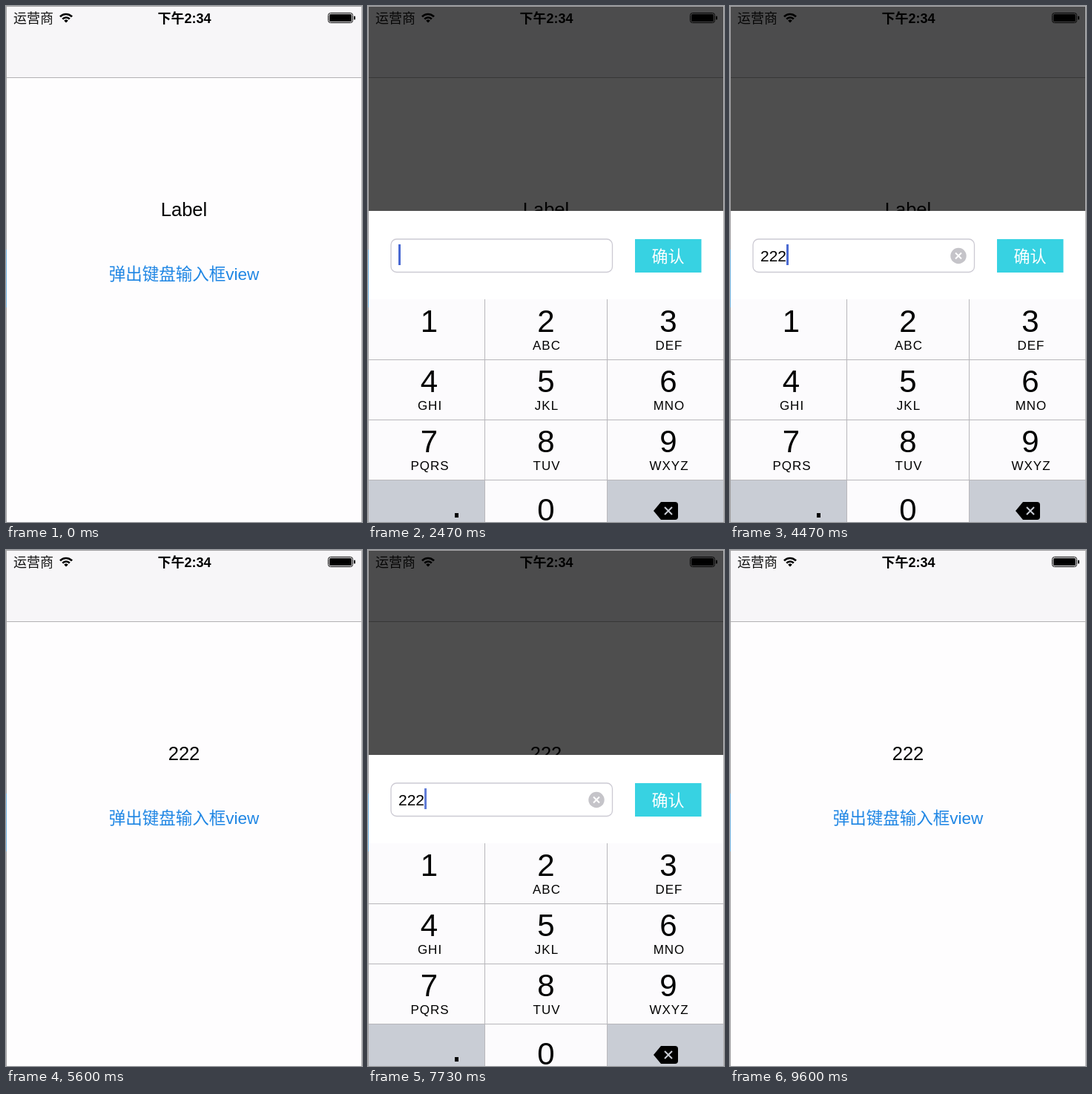
An HTML page with a canvas for the animation above (9.79 s loop, 480 px wide and 695 px high).

```html
<!DOCTYPE html>
<html lang="zh">
<head>
<meta charset="utf-8">
<style>
  html, body { margin: 0; width: 100%; height: 100%; overflow: hidden; background: #fefdfe; }
  canvas { display: block; }
</style>
</head>
<body>
<canvas width="480" height="695"></canvas>
<script>
const ctx = document.querySelector('canvas').getContext('2d');
const LOOP = 9790, SCREEN_H = 720, PANEL_Y = 276, KEYS_Y = 395, ROW = 81;
const FONT = '"Liberation Sans", Arial, "Noto Sans CJK SC", "Noto Sans CJK", sans-serif';

// Each visit: link pressed, panel opens, panel closes (ms)
const VISITS = [
  { press: 870, open: 1184, close: 4680 },
  { press: 6270, open: 6746, close: 8194 },
];
const TAPS = [3900, 4110, 4320];
const ALERT = { show: 2560, hide: 3400 };
const COLUMNS = [[0, 157, 82.5], [158, 164, 240], [323, 157, 405]];
const LETTERS = ['', 'ABC', 'DEF', 'GHI', 'JKL', 'MNO', 'PQRS', 'TUV', 'WXYZ'];

const clamp = v => Math.max(0, Math.min(1, v));
const ramp = (t, start, length) => clamp((t - start) / length);
const easeOut = v => Math.sin(v * Math.PI / 2);
const settle = ms => 1 - Math.exp(-Math.max(0, ms) / 100);

function rect(x, y, w, h, color) {
  ctx.fillStyle = color;
  ctx.fillRect(x, y, w, h);
}

function text(str, x, y, size, color = '#000', align = 'center', weight = 400, spacing = 0) {
  ctx.font = `${weight} ${size}px ${FONT}`;
  ctx.letterSpacing = spacing + 'px';
  ctx.textAlign = align;
  ctx.fillStyle = color;
  ctx.fillText(str, x, y);
}

function round(x, y, w, h, r) {
  ctx.beginPath();
  ctx.roundRect(x, y, w, h, r);
}

function cross(x, y, r, color) {
  ctx.beginPath();
  ctx.moveTo(x - r, y - r); ctx.lineTo(x + r, y + r);
  ctx.moveTo(x + r, y - r); ctx.lineTo(x - r, y + r);
  ctx.strokeStyle = color;
  ctx.lineWidth = 2;
  ctx.stroke();
}

function statusBar() {
  text('运营商', 10, 22.5, 18, '#111', 'left');
  text('下午2:34', 240.5, 22.5, 18, '#000', 'center', 700);
  ctx.strokeStyle = '#000';
  ctx.lineWidth = 2.6;
  for (const r of [6.5, 11]) {
    ctx.beginPath();
    ctx.arc(81, 22, r, -Math.PI * .76, -Math.PI * .24);
    ctx.stroke();
  }
  ctx.fillStyle = '#000';
  ctx.beginPath();
  ctx.moveTo(81, 22.5);
  ctx.arc(81, 22, 3.6, -Math.PI * .78, -Math.PI * .22);
  ctx.fill();
  ctx.lineWidth = 1;
  round(434.5, 9.5, 33, 13, 3);
  ctx.stroke();
  round(436, 11, 30, 10, 1.5);
  ctx.fill();
  round(469, 13.5, 2, 5, 1);
  ctx.fill();
}

function page(label, linkAlpha) {
  rect(0, 0, 480, 695, '#fefdfe');
  rect(0, 0, 480, 96, '#f7f6f8');
  rect(0, 96, 480, 1, '#b2b1b3');
  statusBar();
  text(label, 240, 283, 25.5);
  ctx.globalAlpha = linkAlpha;
  text('弹出键盘输入框view', 240, 368.5, 22.5, '#1f86e4');
  ctx.globalAlpha = 1;
}

function inputPanel(y, value, cursorAlpha) {
  rect(0, y, 480, SCREEN_H, '#fff');
  round(31, y + 38, 298.5, 44.5, 7.5);
  ctx.strokeStyle = '#cccad3';
  ctx.lineWidth = 1.3;
  ctx.stroke();
  text(value, 41, y + 67.5, 21, '#000', 'left');
  ctx.globalAlpha = cursorAlpha;
  rect(41 + value.length * 11.68, y + 45, 3, 28, '#4a6ad2');
  ctx.globalAlpha = 1;
  if (value) {
    ctx.beginPath();
    ctx.arc(308, y + 60.5, 10.7, 0, 7);
    ctx.fillStyle = '#c5c4c9';
    ctx.fill();
    cross(308, y + 60.5, 4, '#fff');
  }
  rect(360, y + 38, 89.5, 45, '#37d2e2');
  text('确认', 404.5, y + 69, 22, '#fff');
}

function keyboard(y, twoPressed) {
  rect(0, y, 480, 324, '#fcfbfd');
  for (const c of [0, 2]) rect(COLUMNS[c][0], y + 3 * ROW, COLUMNS[c][1], ROW, '#c9cdd5');
  if (twoPressed) rect(158, y, 164, ROW, '#c9cdd5');
  for (const x of [157, 322]) rect(x, y, 1, 324, '#b8b7bb');
  for (let row = 1; row < 4; row++) rect(0, y + row * ROW, 480, 1, '#b8b7bb');
  LETTERS.forEach((letters, i) => {
    const x = COLUMNS[i % 3][2], top = y + Math.floor(i / 3) * ROW;
    text(i + 1, x, top + 44, 42);
    text(letters, x + 1, top + 67.5, 17, '#000', 'center', 400, 1);
  });
  const last = y + 3 * ROW;
  text('0', 240, last + 55, 42);
  rect(117, last + 45, 5, 6, '#000');
  ctx.beginPath();
  ctx.moveTo(385, last + 42);
  ctx.lineTo(395, last + 30);
  ctx.arcTo(418, last + 30, 418, last + 54, 4);
  ctx.arcTo(418, last + 54, 395, last + 54, 4);
  ctx.lineTo(395, last + 54);
  ctx.fillStyle = '#000';
  ctx.fill();
  cross(405, last + 42, 5, '#c9cdd5');
}

function alertBox(alpha, scale) {
  ctx.save();
  ctx.globalAlpha = alpha;
  rect(0, 0, 480, 695, 'rgba(0,0,0,.4)');
  ctx.translate(240, 359.5);
  ctx.scale(scale, scale);
  ctx.translate(-240, -359.5);
  round(38, 282, 404, 155, 10.5);
  ctx.clip();
  const frost = ctx.createLinearGradient(0, 282, 0, 437);
  frost.addColorStop(0, '#dddcdf');
  frost.addColorStop(.3, '#f1f1f3');
  frost.addColorStop(1, '#f0eff1');
  rect(38, 282, 404, 155, frost);
  const glow = ctx.createRadialGradient(405, 335, 5, 405, 335, 78);
  glow.addColorStop(0, 'rgba(190,250,250,.95)');
  glow.addColorStop(.5, 'rgba(200,248,249,.7)');
  glow.addColorStop(1, 'rgba(225,247,248,0)');
  rect(38, 282, 404, 155, glow);
  rect(38, 371, 404, 1, '#b6b8bb');
  text('请输入内容', 240.5, 336, 25, '#000', 'center', 700);
  text('确认', 240.5, 414, 24.5, '#1a7fe2');
  ctx.restore();
}

function draw(t) {
  const visit = t < VISITS[1].press ? VISITS[0] : VISITS[1];
  const { press, open, close } = visit;
  const shown = t < close ? settle(t - open) : 1 - settle(t - close);
  const dim = t < close ? easeOut(ramp(t, open, 300)) : 1 - easeOut(ramp(t, close, 300));
  const linkAlpha = t < press ? 1 : .2 + .8 * ramp(t, open, 350);
  const typed = TAPS.filter(tap => t >= tap);

  page(t < VISITS[0].close ? 'Label' : '222', linkAlpha);
  rect(0, 0, 480, 695, `rgba(0,0,0,${.69 * dim})`);

  // The caret restarts its blink after every keystroke
  const since = t - (visit === VISITS[0] && typed.length ? typed.at(-1) : open);
  const phase = since % 1000;
  const caret = 1 - ramp(phase, 500, 150) + ramp(phase, 880, 120);
  const away = 1 - shown;
  inputPanel(PANEL_Y + away * (SCREEN_H - PANEL_Y), '2'.repeat(typed.length), caret);
  keyboard(KEYS_Y + away * (SCREEN_H - KEYS_Y), typed.some(tap => t < tap + 110));

  const entering = easeOut(ramp(t, ALERT.show, 350));
  const alpha = entering * (1 - ramp(t, ALERT.hide, 300));
  if (alpha > 0) alertBox(alpha, 1.2 - .2 * entering);

  rect(0, 0, 480, 1, '#a3a2a4');
  rect(0, 0, 1, 695, '#a3a2a4');
  rect(479, 0, 1, 695, '#b5b4b6');
  rect(0, 328, 1, 78, '#74b4e0');
}

const start = performance.now();
function tick() {
  draw((performance.now() - start) % LOOP);
  requestAnimationFrame(tick);
}
tick();
</script>
</body>
</html>
```
